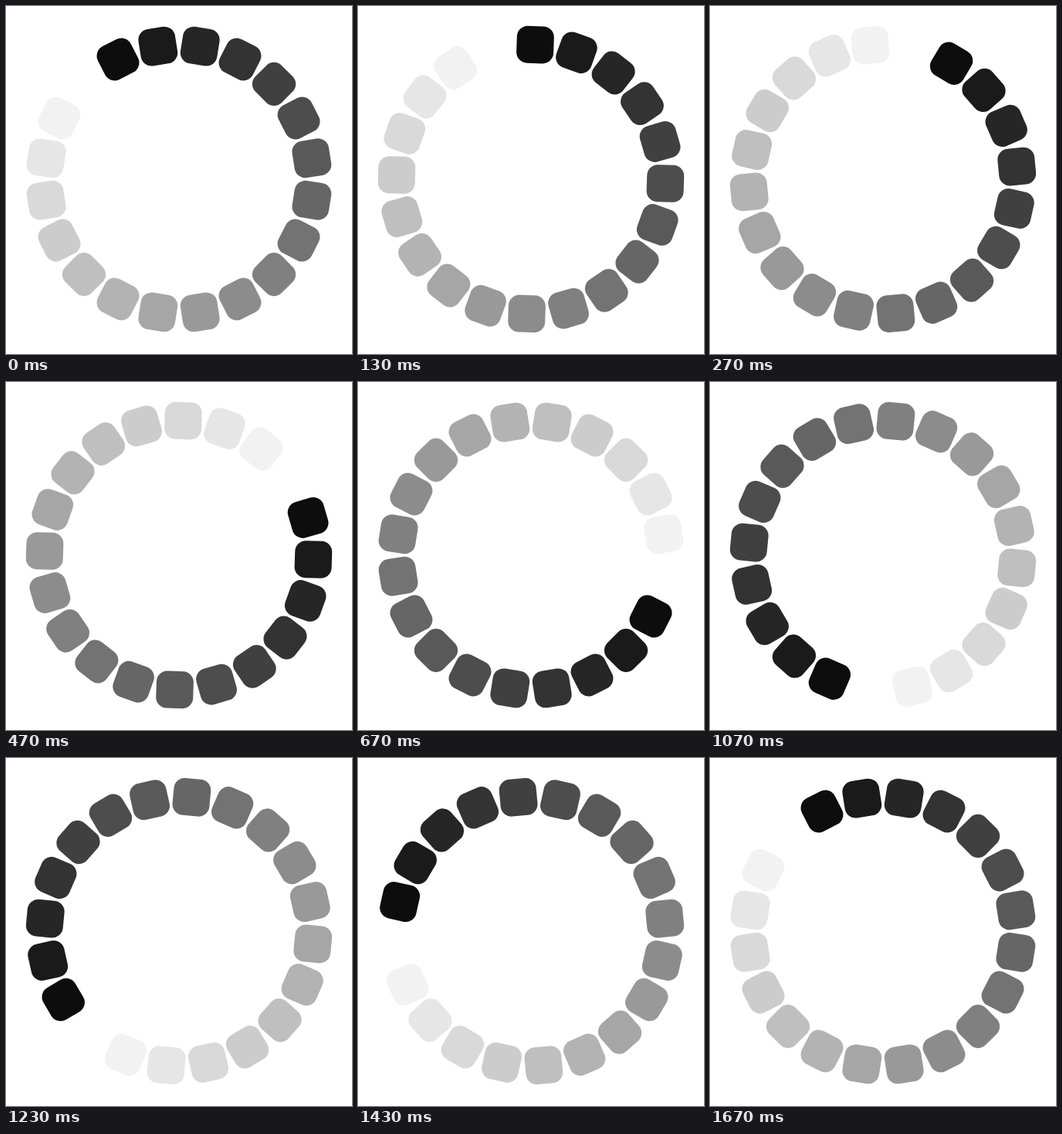
An HTML page that plays this animation: 448x450 px, repeating every 1.71 s.

```html
<!DOCTYPE html>
<html lang="en">
<head>
<meta charset="utf-8">
<title>Loading ring</title>
<style>
  html, body { margin: 0; width: 100%; height: 100%; overflow: hidden; background: #fff; }
  svg { display: block; }
</style>
</head>
<body>
<svg width="448" height="450" viewBox="0 0 448 450">
  <g id="ring"></g>
</svg>
<script>
const CENTER = 224, RADIUS = 174, SIZE = 48, CORNER = 14;
const SLOTS = 20, FIRST_ANGLE = -27;
const STEPS = 50, LOOP = 1710;

const ring = document.getElementById('ring');

// One slot stays empty; the tiles fade clockwise from near black to near white.
for (let i = 0; i < SLOTS - 1; i++) {
  const tile = document.createElementNS('http://www.w3.org/2000/svg', 'rect');
  const grey = Math.round(255 * (i + 1) / SLOTS);
  const attrs = {
    x: -SIZE / 2, y: -RADIUS - SIZE / 2,
    width: SIZE, height: SIZE, rx: CORNER,
    fill: `rgb(${grey},${grey},${grey})`,
    transform: `rotate(${FIRST_ANGLE + i * 360 / SLOTS})`
  };
  for (const name in attrs) tile.setAttribute(name, attrs[name]);
  ring.append(tile);
}

// Thirty steps per second, each start rounded to 10 ms.
const stepStart = n => Math.round(n * 10 / 3) * 10;

function stepAt(time) {
  let n = STEPS;
  while (n > 0 && stepStart(n) > time) n--;
  return n;
}

function draw(time) {
  const angle = stepAt(time % LOOP) * 360 / STEPS;
  ring.setAttribute('transform', `translate(${CENTER} ${CENTER}) rotate(${angle})`);
}

const start = performance.now();
function tick() {
  draw(performance.now() - start);
  requestAnimationFrame(tick);
}
draw(0);
requestAnimationFrame(tick);
</script>
</body>
</html>
```
